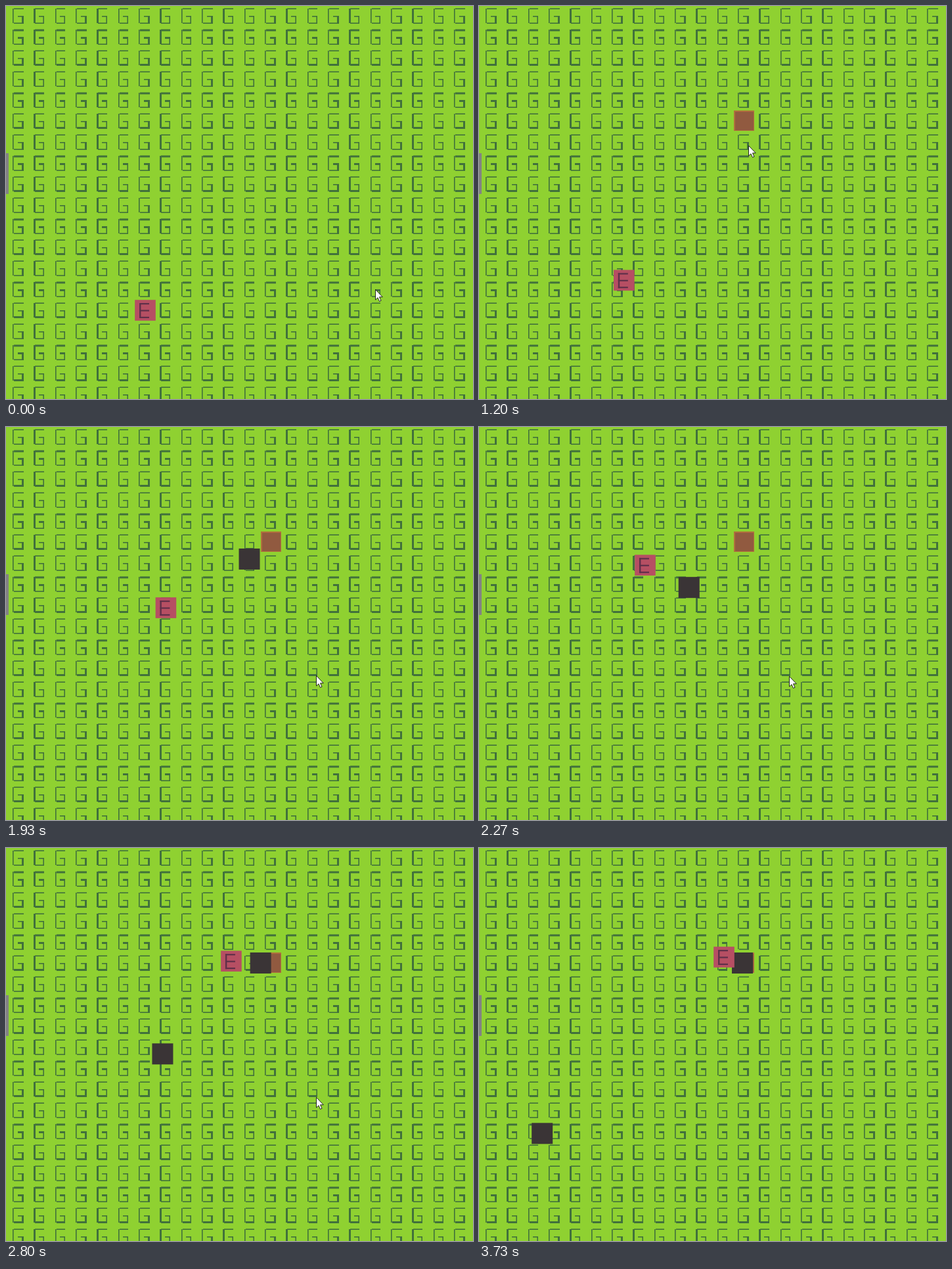
Animation of 711x598 px, one loop 3.79 s. Source, as an HTML page with a canvas:

```html
<!DOCTYPE html>
<html>
<head>
<meta charset="utf-8">
<style>
html, body { margin: 0; height: 100%; overflow: hidden; background: #8fd131; }
canvas { display: block; }
</style>
</head>
<body>
<canvas id="stage" width="711" height="598"></canvas>
<script>
const LOOP = 3790, TICK = 200 / 3, TILE = 32, LEFT = 4, TOP = -1;
const BUILD = 14, FIRST_SHOT = 26, RELOAD = 15, LAST = 56, BULLET_SPEED = 13.34;
const ENEMY_START = 14.45, ENEMY_SPEED = 13.1;
const stage = document.getElementById('stage');
const ctx = stage.getContext('2d');
const field = document.createElement('canvas');
field.width = stage.width;
field.height = stage.height;

const route = document.createElementNS('http://www.w3.org/2000/svg', 'path');
route.setAttribute('d', 'M196 447L212 364L237 194Q239 173 262 169.5L357 150');

const cursorStart = { x: 562, y: 431 };
const cursorMoves = [
  { from: 0, to: 8, x: 424, y: 180 },
  { from: 8, to: 11, x: 397, y: 180 },
  { from: 16, to: 23.5, x: 472, y: 364 },
  { from: 23.5, to: 30, x: 472, y: 379 },
  { from: 45, to: 51, x: 214, y: 574 }
];

const clamp = v => Math.min(1, Math.max(0, v));
const smooth = v => v * v * (3 - 2 * v);

function enemyAt(tick) {
  return route.getPointAtLength(Math.max(0, tick - ENEMY_START) * ENEMY_SPEED);
}

function cursorAt(tick) {
  let { x, y } = cursorStart;
  for (const move of cursorMoves) {
    const k = smooth(clamp((tick - move.from) / (move.to - move.from)));
    x += (move.x - x) * k;
    y += (move.y - y) * k;
  }
  return { x, y };
}

// Flies straight at where the enemy was when fired; null once it has hit
function bulletAt(fired, tick) {
  const aim = enemyAt(fired);
  const pos = { x: 385, y: 159 };
  const angle = Math.atan2(aim.y - pos.y, aim.x - pos.x);
  for (let t = fired + 1; t <= tick; t++) {
    pos.x += BULLET_SPEED * Math.cos(angle);
    pos.y += BULLET_SPEED * Math.sin(angle);
    const enemy = enemyAt(t);
    if (Math.hypot(pos.x - enemy.x, pos.y - enemy.y) < TILE / 2) return null;
  }
  return pos;
}

function box(c, color, x, y, w, h) {
  c.fillStyle = color;
  c.fillRect(x, y, w, h);
}

// Stroke weights repeat every three tiles, like an unevenly scaled sprite
function drawGrass(c, col, row) {
  const x = LEFT + col * TILE, y = TOP + row * TILE, ink = '#41713c';
  const weight = (index, phase) => index % 3 === phase ? 3 : 1.6;
  const left = weight(col, 1), right = weight(col, 0);
  const top = weight(row, 1), bottom = weight(row, 2);
  const start = col % 3 === 2 ? 7 : 6, end = col % 3 ? 22 : 23;
  box(c, ink, x + start, y + 5, left, 22);
  box(c, ink, x + start + 2, y + 4.4, end - start - 2, top);
  box(c, ink, x + start + 2, y + 28 - bottom, end - start - 2, bottom);
  box(c, ink, x + 14, y + 16, end - 14, top);
  box(c, ink, x + end - right, y + 16, right, 11);
}

function drawField() {
  const c = field.getContext('2d');
  box(c, '#8fd131', 0, 0, field.width, field.height);
  for (let row = 0; row < 19; row++)
    for (let col = 0; col < 22; col++) drawGrass(c, col, row);
  box(c, '#838383', 0, 224, 4, 62);
}

function drawTower() {
  box(ctx, '#b0703c', 388, 159, 31, 31);
  box(ctx, '#915a40', 390, 161, 28, 28);
}

function drawBullet(pos) {
  if (pos) box(ctx, '#3a3436', pos.x, pos.y, TILE, TILE);
}

function drawEnemy({ x, y }) {
  const ink = '#5f3049';
  box(ctx, '#b64f63', x + 0.2, y + 0.2, 31.6, 31.6);
  box(ctx, ink, x + 7, y + 5, 2.4, 23);
  for (let bar = 0; bar < 3; bar++) box(ctx, ink, x + 7, y + 5 + bar * 10.4, 15, 2.2);
}

function drawCursor({ x, y }) {
  const arrow = new Path2D('M.5 .5V16L4 12.8L6.5 18.4L9 17.3L6.5 11.8H11.3Z');
  ctx.save();
  ctx.translate(Math.round(x), Math.round(y));
  ctx.fillStyle = '#fff';
  ctx.fill(arrow);
  ctx.strokeStyle = '#111';
  ctx.lineWidth = 0.9;
  ctx.stroke(arrow);
  ctx.restore();
}

function render(now) {
  const tick = Math.floor((now % LOOP + 3.4) / TICK);
  ctx.drawImage(field, 0, 0);
  if (tick >= BUILD) drawTower();
  for (let fired = FIRST_SHOT; fired <= Math.min(tick, LAST); fired += RELOAD)
    drawBullet(bulletAt(fired, tick));
  drawEnemy(enemyAt(tick));
  if (tick <= 51) drawCursor(cursorAt(tick));
}

function loop() {
  render(performance.now());
  requestAnimationFrame(loop);
}

drawField();
loop();
</script>
</body>
</html>
```
